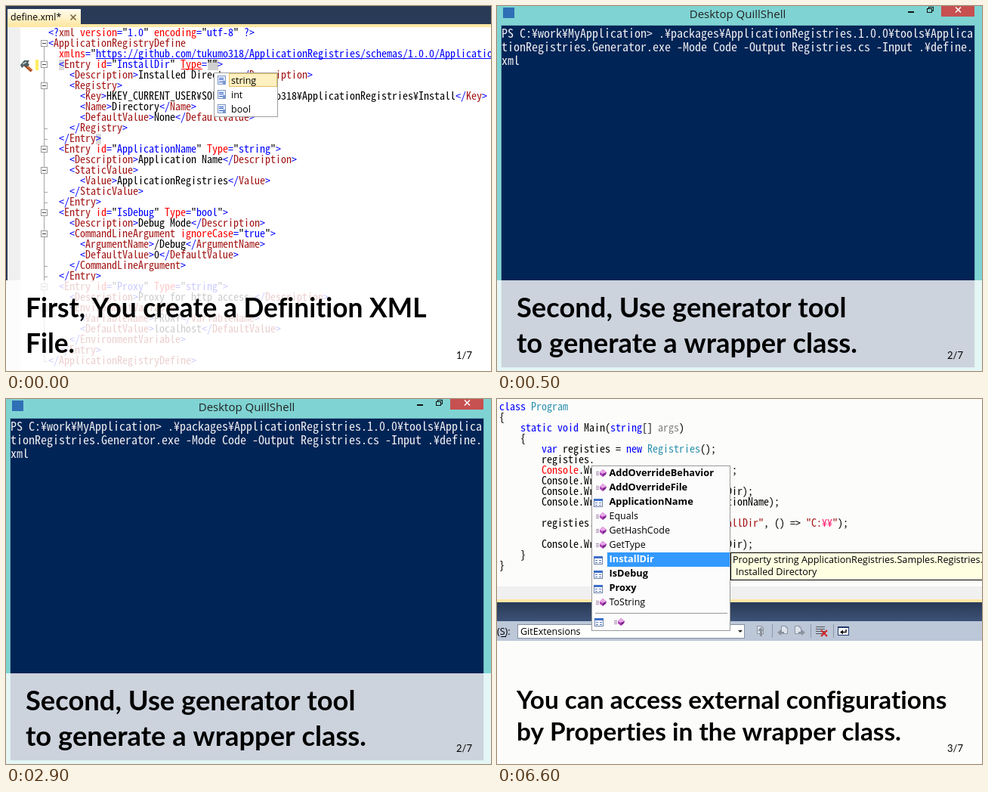
Animation, 642 px wide and 483 px high, one loop 8000 ms. Source, as an HTML page with a canvas:

```html
<!DOCTYPE html>
<html lang="en">
<head>
<meta charset="utf-8">
<title>Three steps</title>
<style>
  html, body { margin: 0; width: 100%; height: 100%; overflow: hidden; background: #fff; }
  canvas { display: block; }
</style>
</head>
<body>
<canvas id="stage" width="642" height="483"></canvas>
<script>
const ctx = document.getElementById('stage').getContext('2d');
const MONO = '"Noto Sans Mono CJK JP", "Noto Sans Mono", monospace';
const UI = '"Open Sans", "Noto Sans", sans-serif';
const TITLE = 'Lato, sans-serif';
const NAVY = '#293a56', BLUE = '#0000ff', MAROON = '#a31515', GOLD = '#ffe8a6';

function rect(x, y, w, h, fill, stroke) {
  if (fill) { ctx.fillStyle = fill; ctx.fillRect(x, y, w, h); }
  if (stroke) {
    ctx.strokeStyle = stroke;
    ctx.lineWidth = 1;
    ctx.strokeRect(x + .5, y + .5, w - 1, h - 1);
  }
}

function line(color, width, ...points) {
  ctx.beginPath();
  for (let i = 0; i < points.length; i += 2) ctx.lineTo(points[i], points[i + 1]);
  ctx.strokeStyle = color;
  ctx.lineWidth = width;
  ctx.stroke();
}

function shape(color, ...points) {
  ctx.beginPath();
  for (let i = 0; i < points.length; i += 2) ctx.lineTo(points[i], points[i + 1]);
  ctx.fillStyle = color;
  ctx.fill();
}

function cross(x, y, r, color, width) {
  line(color, width, x - r, y - r, x + r, y + r);
  line(color, width, x - r, y + r, x + r, y - r);
}

function verticalGradient(y0, y1, ...colors) {
  const gradient = ctx.createLinearGradient(0, y0, 0, y1);
  colors.forEach((color, i) => gradient.addColorStop(i / (colors.length - 1), color));
  return gradient;
}

function text(str, x, y, font, color = '#000') {
  ctx.font = font;
  ctx.fillStyle = color;
  ctx.fillText(str, x, y);
}

const ui = (str, x, y, color, weight = '', size = 12.5) =>
  text(str, x, y, `${weight} ${size}px ${UI}`, color);

// Monospaced font whose characters advance by the given pitch
function monoFont(pitch) {
  ctx.font = `100px ${MONO}`;
  return `${pitch * 100 / ctx.measureText('0').width}px ${MONO}`;
}
const codeFont = monoFont(7), consoleFont = monoFont(8);
const code = (str, x, y, color) => text(str, x, y, codeFont, color);

function caption(lines, size, baselines, page) {
  ctx.letterSpacing = '0.01px'; // any spacing turns ligatures off
  lines.forEach((str, i) => text(str, 26, baselines[i], `bold ${size}px ${TITLE}`));
  ctx.letterSpacing = '0px';
  text(page + '/7', 596, 467, `13px ${TITLE}`);
}

const veil = () => rect(0, 363, 642, 120, 'rgba(255,255,255,.8)');

const xml = `<?xml version="1.0" encoding="utf-8" ?>
<ApplicationRegistryDefine
  xmlns="https://github.com/tukumo318/ApplicationRegistries/schemas/1.0.0/ApplicationRegistryDefine.xsd">
  <Entry id="InstallDir" Type="">
    <Description>Installed Directory</Description>
    <Registry>
      <Key>HKEY_CURRENT_USER¥SOFTWARE¥tukumo318¥ApplicationRegistries¥Install</Key>
      <Name>Directory</Name>
      <DefaultValue>None</DefaultValue>
    </Registry>
  </Entry>
  <Entry id="ApplicationName" Type="string">
    <Description>Application Name</Description>
    <StaticValue>
      <Value>ApplicationRegistries</Value>
    </StaticValue>
  </Entry>
  <Entry id="IsDebug" Type="bool">
    <Description>Debug Mode</Description>
    <CommandLineArgument ignoreCase="true">
      <ArgumentName>/Debug</ArgumentName>
      <DefaultValue>0</DefaultValue>
    </CommandLineArgument>
  </Entry>
  <Entry id="Proxy" Type="string">
    <Description>Proxy for http access.</Description>
    <EnvironmentVariable>
      <VariableName>PROXY</VariableName>
      <DefaultValue>localhost</DefaultValue>
    </EnvironmentVariable>
  </Entry>
</ApplicationRegistryDefine>`.split('\n');

function drawXml() {
  let inTag = false, nameNext = false;
  xml.forEach((str, row) => {
    const y = 40 + row * 14;
    for (const match of str.matchAll(/"[^"]*"|<[?\/]?|\??>|=|[^<>"=\s]+/g)) {
      const token = match[0], x = 56 + match.index * 7;
      if (token[0] === '<') {
        inTag = nameNext = true;
        code(token, x, y, BLUE);
      } else if (token.endsWith('>')) {
        inTag = false;
        code(token, x, y, BLUE);
      } else if (token[0] === '"') {
        const value = token.slice(1, -1);
        code('"', x, y);
        code(value, x + 7, y, BLUE);
        code('"', x + token.length * 7 - 7, y);
        if (value.startsWith('https')) rect(x + 7, y + 1, value.length * 7, 1, BLUE);
      } else if (token === '=') {
        code(token, x, y, BLUE);
      } else {
        code(token, x, y, !inTag ? '#000' : nameNext ? MAROON : '#ff0000');
        nameNext = false;
      }
    }
  });
}

function drawOutline() {
  rect(50, 54, 1, 418, '#a5a5a5');
  for (const row of [9, 10, 15, 16, 22, 23, 29, 30, 31]) rect(50, 36 + row * 14, 5, 1, '#a5a5a5');
  for (const row of [1, 3, 5, 11, 13, 17, 19, 24, 26]) {
    const y = 31 + row * 14;
    rect(46, y, 9, 9, '#fff', '#999');
    rect(48, y + 4, 5, 1, '#444');
  }
}

function drawHammer() {
  line('#a8481f', 4, 25, 78, 34, 86);
  line('#d2803f', 1.5, 26, 78, 34, 85);
  shape('#4c5c60', 19, 78, 24, 72, 31, 72, 29, 75, 31, 78, 27, 81, 24, 79, 21, 82);
  line('#b4c6c4', 2, 22, 77, 27, 74);
}

function drawDefinition() {
  rect(0, 0, 642, 483, '#fff');
  rect(0, 28, 19, 455, '#f0f0f0');
  rect(0, 0, 642, 25, NAVY);
  rect(0, 24, 642, 4, GOLD);
  rect(0, 0, 2, 363, NAVY);
  rect(2, 4, 97, 21, verticalGradient(4, 25, '#fffbef', '#fff3cf', GOLD));
  ui('define.xml*', 6, 19, '#000', '', 12.3);
  cross(89, 15, 3.5, '#75633d', 1.6);

  rect(39, 71, 4, 14, '#ffee62');
  rect(70, 71, 7, 14, '#dbdbdb');
  rect(267, 71, 14, 14, '#d0d0d0');
  rect(119, 169, 7, 14, '#dbdbdb');
  drawOutline();
  drawHammer();
  drawXml();
  rect(232, 83, 28, 1, '#ff0000');

  rect(275, 88, 85, 59, '#fff', '#a0a0a0');
  rect(295, 89, 64, 18, '#fff0c0', '#e5c365');
  ['string', 'int', 'bool'].forEach((name, i) => {
    const y = 92 + i * 19;
    rect(280, y, 11, 12, '#e4eeff', '#8296bd');
    for (const dy of [3, 5, 8]) rect(282, y + dy, 6, 1, '#355fc4');
    rect(287, y + 7, 4, 5, '#7895cf');
    ui(name, 298, y + 11);
  });

  veil();
  caption(['First, You create a Definition XML', 'File.'], 35.3, [412, 459], 1);
}

function drawConsole() {
  rect(0, 0, 642, 483, '#7fd4d3');
  rect(8, 2, 15, 14, '#2f6fb5');
  ctx.textAlign = 'center';
  ui('Desktop QuillShell', 318.5, 16, '#222', '', 15);
  ctx.textAlign = 'left';
  rect(544, 7, 8, 2, '#111');
  rect(571, 1, 7, 6, null, '#111');
  rect(569, 3, 7, 6, '#7fd4d3', '#111');
  rect(588, 0, 44, 14, '#c75050');
  cross(610.5, 5, 3.5, '#fff', 1.6);

  rect(5, 25, 628, 454, '#6bb5ba');
  rect(6, 26, 626, 452, '#012456');
  ['PS C:¥work¥MyApplication> .¥packages¥ApplicationRegistries.1.0.0¥tools¥Applica',
   'tionRegistries.Generator.exe -Mode Code -Output Registries.cs -Input .¥define.',
   'xml'].forEach((str, i) => text(str, 6, 42 + i * 18, consoleFont, '#eeedf0'));

  veil();
  caption(['Second, Use generator tool', 'to generate a wrapper class.'], 36.3, [412, 459], 2);
}

const program = `class Program
{
    static void Main(string[] args)
    {
        var registies = new Registries();
        registies.
        Console.WriteLine(registies.IsDebug);
        Console.WriteLine(registies.Proxy);
        Console.WriteLine(registies.InstallDir);
        Console.WriteLine(registies.ApplicationName);

        registies.AddOverrideBehavior("InstallDir", () => "C:¥¥");

        Console.WriteLine(registies.InstallDir);
    }
}`.split('\n');

function drawProgram() {
  program.forEach((str, row) => {
    for (const match of str.matchAll(/"[^"¥]*(?:"|(?=¥))|¥+|"|\w+|[^\w\s"]+/g)) {
      const token = match[0];
      let color = '#000';
      if (token[0] === '"') color = MAROON;
      else if (token[0] === '¥') color = '#ff1068';
      else if (/^(class|static|void|string|var|new)$/.test(token)) color = BLUE;
      else if (/^(Program|Registries)$/.test(token)) color = '#2b91af';
      else if (token === 'args') color = '#808080';
      else if (token === 'Console' && row === 6) color = '#ff0000';
      code(token, 3 + match.index * 7, 15 + row * 14, color);
    }
  });
}

function propertyIcon(x, y) {
  rect(x - 6, y - 5, 12, 11, '#fff', '#6a7fa8');
  rect(x - 6, y - 5, 12, 3, '#3f6fc8');
  for (const dy of [0, 3]) {
    rect(x - 4, y + dy, 3, 1, '#5577bb');
    rect(x + 1, y + dy, 3, 1, '#5577bb');
  }
}

function methodIcon(x, y) {
  for (const dy of [-2, 0, 2]) rect(x - 7, y + dy, 4, 1, '#a58ab0');
  shape('#b044b8', x - 2, y - 1, x + 2, y - 5, x + 7, y - 1, x + 2, y + 5, x - 2, y + 2);
  shape('#e9a7e8', x - 2, y - 1, x + 2, y - 5, x + 7, y - 1, x + 2, y + 1);
  shape('#7d2a8d', x + 2, y + 1, x + 7, y - 1, x + 6, y + 2, x + 2, y + 5);
}

// Bold members come from the wrapper class; a leading @ marks a property
const members = ['*AddOverrideBehavior', '*AddOverrideFile', '*@ApplicationName', 'Equals', 'GetHashCode',
  'GetType', '*@InstallDir', '*@IsDebug', '*@Proxy', 'ToString'];

function drawMembers() {
  rect(125, 88, 184, 219, '#fcfcfc', '#999');
  members.forEach((member, i) => {
    const y = 97 + i * 19, selected = i === 6, bold = member[0] === '*';
    if (selected) rect(146, y - 8, 162, 19, '#3399ff');
    if (member.includes('@')) propertyIcon(134, y + 2);
    else methodIcon(138, y + 1);
    ui(member.replace(/[*@]/g, ''), 148.5, y + 4.5, selected ? '#fff' : '#000',
      bold ? 'bold' : '', bold ? 12.8 : 12.5);
  });
  rect(130, 283, 175, 1, '#999');
  propertyIcon(135, 295);
  methodIcon(162, 295);
}

function page(x, y) {
  shape('#8d95a3', x, y, x + 6, y, x + 9, y + 3, x + 9, y + 11, x, y + 11);
  shape('#dfe4ec', x + 1, y + 1, x + 5, y + 1, x + 8, y + 4, x + 8, y + 10, x + 1, y + 10);
}

function arrow(x, y, dir) {
  shape('#8b929e', x, y - 4, x, y + 4, x + dir * 5, y);
  rect(dir > 0 ? x - 4 : x, y - 1, 4, 2, '#8b929e');
}

function drawToolbar() {
  rect(0, 248, 642, 17, '#f0f0f0');
  rect(0, 265, 642, 4, GOLD);
  rect(0, 269, 642, 25, verticalGradient(269, 294, NAVY, '#3d5277'));
  rect(0, 294, 642, 26, '#bcc7d8');
  ui('(S):', 0, 312);
  rect(5, 314, 7, 1, '#000');
  rect(27, 298, 301, 19, '#fff', '#8591a2');
  ui('GitExtensions', 31, 312);
  shape('#222', 319, 306, 325, 306, 322, 309);
  for (const x of [364, 415, 445]) rect(x, 298, 1, 18, '#8d99ad');

  page(344, 300);
  shape('#8b929e', 345, 307, 349, 302, 353, 307);
  rect(348, 306, 3, 8, '#8b929e');
  page(376, 300);
  arrow(376, 309, -1);
  page(394, 300);
  arrow(403, 309, 1);
  for (let i = 0; i < 4; i++) rect(422, 301 + i * 3, 12, 1, '#555');
  cross(433, 310, 4, '#d02424', 2);
  rect(451, 301, 15, 12, '#fff', '#203a70');
  rect(451, 301, 15, 2, '#203a70');
  line('#111', 1.5, 462, 305, 462, 308.5, 456, 308.5);
  shape('#111', 454, 308.5, 458, 305.5, 458, 311.5);
}

function drawUsage() {
  rect(0, 0, 642, 483, '#fcfcfa');
  drawProgram();
  drawToolbar();
  drawMembers();
  rect(309, 203, 340, 37, '#ffffe1', '#000');
  ui('Property string ApplicationRegistries.Samples.Registries.InstallDir', 312, 217, '#000', '', 12.65);
  ui('Installed Directory', 316, 233, '#000', '', 12.65);
  caption(['You can access external configurations', 'by Properties in the wrapper class.'], 33.3, [410, 452], 3);
}

function frame() {
  const time = performance.now() % 8000;
  if (time < 500) drawDefinition();
  else if (time < 4500) drawConsole();
  else drawUsage();
  requestAnimationFrame(frame);
}
frame();
</script>
</body>
</html>
```
